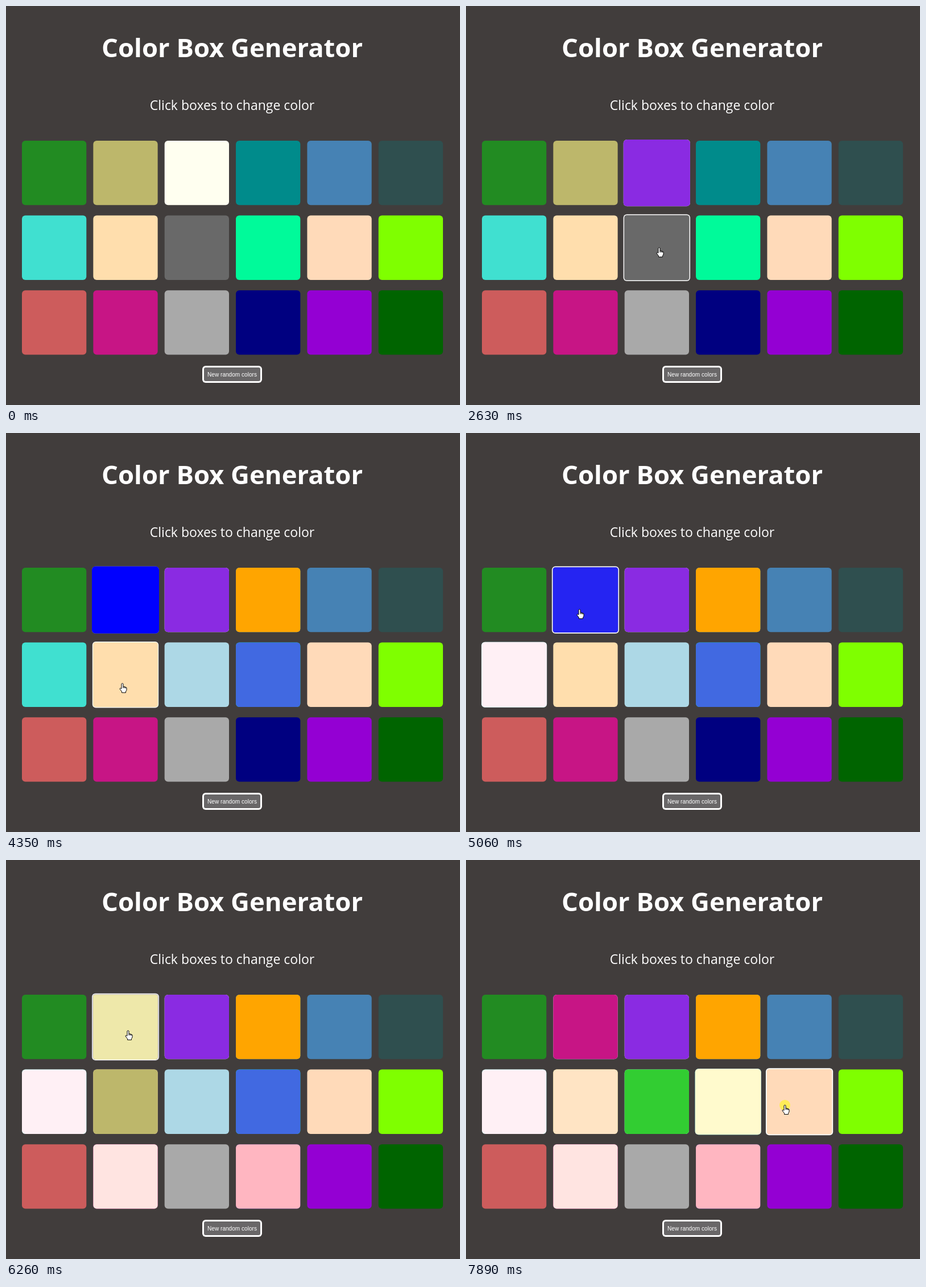
Recreate the animation shown at these times as an HTML page with a canvas. Size 798 px wide and 702 px high, loop 7990 ms.

```html
<!DOCTYPE html>
<html lang="en">
<head>
<meta charset="utf-8">
<title>Color Box Generator</title>
<style>
  html, body { margin: 0; width: 100%; height: 100%; overflow: hidden; background: #413d3c; }
  canvas { display: block; }
</style>
</head>
<body>
<canvas id="stage" width="798" height="702"></canvas>
<script>
const ctx = document.getElementById('stage').getContext('2d');
const LOOP = 7990, STEP = 101.25, FADE = 250, CLICK = 110;
const SIZE = 113.3, LEFT = 28, TOP = 237, PITCH_X = 125.35, PITCH_Y = 131.6;

const colors = ('forestgreen darkkhaki ivory darkcyan steelblue darkslategray ' +
  'turquoise navajowhite dimgray mediumspringgreen peachpuff chartreuse ' +
  'indianred mediumvioletred darkgray navy darkviolet darkgreen').split(' ');

// Pointer route: time, x, y and, where it clicks, the new color of the box below
const route = [
  [400, 599, 662],
  [570, 573, 655],
  [1200, 585, 555],
  [1480, 595, 440],
  [1850, 459, 428],
  [2350, 335, 305, 'blueviolet'],
  [2740, 340, 425, 'lightblue'],
  [3100, 433, 302, 'lightslategray'],
  [3322, 433, 302, 'orange'],
  [3600, 448, 422, 'royalblue'],
  [4100, 205, 302, 'blue'],
  [4587, 205, 458],
  [4800, 92, 428, 'lavenderblush'],
  [5030, 200, 310, 'palegoldenrod'],
  [5210, 200, 425, 'darkkhaki'],
  [5420, 210, 555, 'mistyrose'],
  [5860, 475, 559, 'lightpink'],
  [6430, 215, 300, 'mediumvioletred'],
  [6937, 216, 451, 'bisque'],
  [7210, 340, 435, 'limegreen'],
  [7540, 455, 430, 'lemonchiffon'],
  [7960, 561, 431, 'coral']
];

const hand = new Path2D('M-2 9V1Q-.5-1 1 1V5.5L3 6L5 6.7L7 7.8V12L5.5 14.5V16.5H-1.5V14.5L-5 10Q-5 7.6-2 9.5Z');
const fingers = new Path2D('M1 5.5V8.5M3 6V8.5M5 6.7V9');
const arrow = new Path2D('M0 0V15L3.5 11.7L6 17L8 16L5.7 11H10.5Z');

const clamp = (p) => Math.min(1, Math.max(0, p));
const smooth = (p) => p * p * (3 - 2 * p);
const easeOut = (p) => p * (2 - p);

// The screen refreshes about ten times a second once the pointer moves.
function snap(t) {
  if (t < 1000) return t < 400 ? 0 : t < 500 ? 400 : 500;
  return 1000 + Math.floor((t - 1000) / STEP + 0.15) * STEP;
}

// Each leg: a short pause, a smooth move, then a rest until the next click.
function pointerAt(t) {
  const next = route.findIndex(([time]) => time > t);
  if (next < 1) return (next < 0 ? route.at(-1) : route[0]).slice(1, 3);
  const [t0, x0, y0] = route[next - 1], [t1, x1, y1] = route[next];
  const p = smooth(clamp(((t - t0) / (t1 - t0) - 0.1) / 0.5));
  return [x0 + (x1 - x0) * p, y0 + (y1 - y0) * p];
}

function boxAt([x, y]) {
  const col = Math.floor((x - LEFT) / PITCH_X), row = Math.floor((y - TOP) / PITCH_Y);
  const inside = x - LEFT - col * PITCH_X < SIZE && y - TOP - row * PITCH_Y < SIZE;
  return inside && row < 3 ? row * 6 + col : -1;
}

const clicks = route.filter((stop) => stop[3])
  .map(([time, x, y, color]) => ({ time, color, box: boxAt([x, y]) }));

// Hover levels rise and fall with the pointer's recent history.
function hoverLevels(t) {
  const levels = colors.map(() => 0), dt = 10;
  for (let s = t - 2 * FADE; s < t; s += dt) {
    const over = boxAt(pointerAt(s));
    levels.forEach((level, i) => levels[i] = clamp(level + (i === over ? dt : -dt) / FADE));
  }
  return levels.map(easeOut);
}

function fillRound(x, y, w, h, r, color) {
  ctx.fillStyle = color;
  ctx.beginPath();
  ctx.roundRect(x, y, w, h, r);
  ctx.fill();
}

function drawBox(i, t, hover, isOver) {
  const size = SIZE * (1 + 0.05 * hover), grow = (size - SIZE) / 2;
  const x = LEFT + (i % 6) * PITCH_X - grow, y = TOP + Math.floor(i / 6) * PITCH_Y - grow;
  const edge = isOver ? 2 * hover : 0;
  if (edge) fillRound(x, y, size, size, 6, '#fff');
  const paint = (color) =>
    fillRound(x + edge, y + edge, size - 2 * edge, size - 2 * edge, 6 - edge, color);
  paint(colors[i]);
  for (const { time, box, color } of clicks) {
    if (box !== i || t < time) continue;
    ctx.globalAlpha = easeOut(clamp((t - time) / FADE));
    paint(color);
  }
  ctx.globalAlpha = 1;
}

function drawText(text, y, font) {
  ctx.font = font;
  ctx.fillStyle = '#fff';
  ctx.textAlign = 'center';
  ctx.fillText(text, 397.5, y);
}

function drawPointer([x, y], t, overBox) {
  if (clicks.some(({ time }) => t >= time - CLICK && t < time)) {
    fillRound(x - 10, y - 9, 19, 19, 9.5, 'rgba(255, 238, 70, .85)');
  }
  const shape = overBox ? hand : arrow;
  ctx.save();
  ctx.translate(x, y);
  ctx.fillStyle = '#fff';
  ctx.strokeStyle = '#000';
  ctx.fill(shape);
  ctx.stroke(shape);
  if (overBox) ctx.stroke(fingers);
  ctx.restore();
}

function draw(now) {
  const t = snap(now % LOOP), pointer = pointerAt(t), over = boxAt(pointer);
  ctx.fillStyle = '#413d3c';
  ctx.fillRect(0, 0, 798, 702);
  drawText('Color Box Generator', 90, 'bold 45.4px "Open Sans", sans-serif');
  drawText('Click boxes to change color', 183, '23px "Open Sans", sans-serif');
  hoverLevels(t).forEach((hover, i) => drawBox(i, t, hover, i === over));
  fillRound(345, 633, 105, 30, 6, '#fff');
  fillRound(348, 636, 99, 24, 3, '#696768');
  drawText('New random colors', 651.5, '10.1px "Liberation Sans", Arial, sans-serif');
  if (t >= route[0][0]) drawPointer(pointer, t, over >= 0);
}

let start;
function tick(now) {
  start ??= now;
  draw(now - start);
  requestAnimationFrame(tick);
}
requestAnimationFrame(tick);
</script>
</body>
</html>
```
